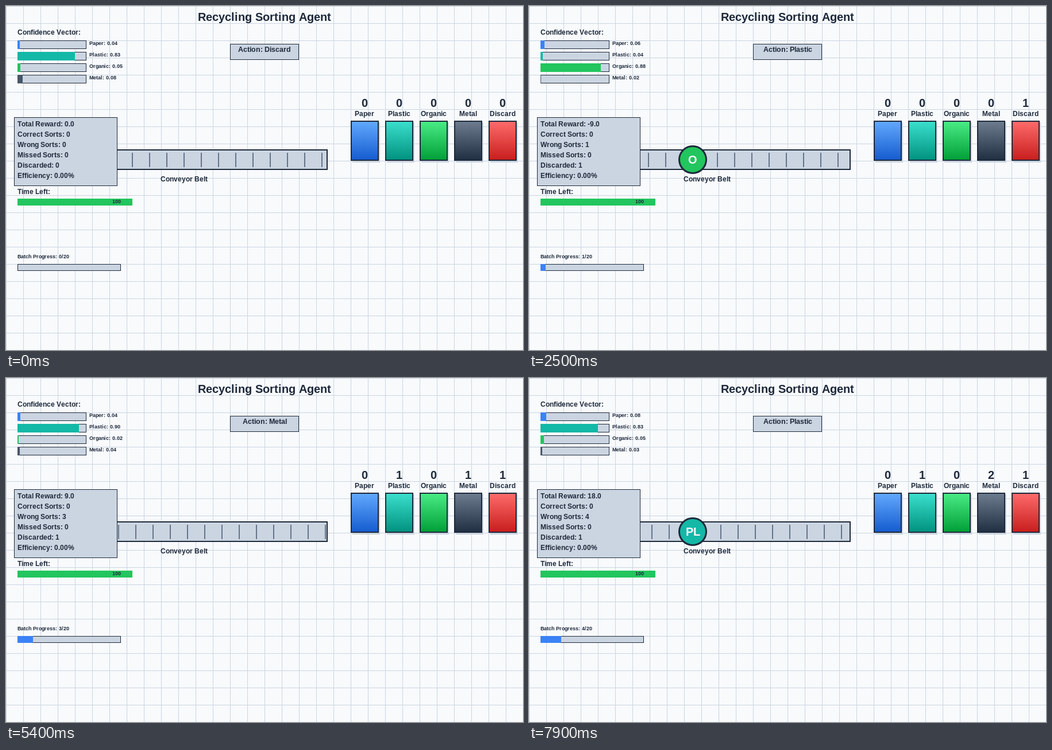
An HTML page with a canvas for the animation above (8 s loop, 900 px wide and 600 px high).

```html
<!DOCTYPE html>
<html lang="en">
<head>
<meta charset="utf-8">
<title>Recycling Sorting Agent</title>
<style>
html, body { margin: 0; width: 100%; height: 100%; overflow: hidden; background: #f8fafc; }
canvas { display: block; }
</style>
</head>
<body>
<canvas id="stage" width="900" height="600"></canvas>
<script>
const ctx = document.getElementById('stage').getContext('2d');
const INK = '#1e293b', PALE = '#cbd5e1', PAPER = '#f8fafc';
const STEP = 100, STEPS = 80, CYCLE = 18, TRAVEL = 15;

const bins = [
  ['Paper', [59, 130, 246]],
  ['Plastic', [20, 184, 166]],
  ['Organic', [34, 197, 94]],
  ['Metal', [71, 85, 105]],
  ['Discard', [239, 68, 68]]
];

// bin and action are indexes into bins; conf follows the order of the first four
const rounds = [
  { bin: 1, tag: 'PL', action: 4, reward: 0, conf: [.038, .834, .049, .08] },
  { bin: 2, tag: 'O', action: 1, reward: -9, conf: [.06, .038, .88, .016] },
  { bin: 2, tag: 'O', action: 3, reward: 0, conf: [.087, .027, .842, .04] },
  { bin: 1, tag: 'PL', action: 3, reward: 9, conf: [.043, .896, .02, .04] },
  { bin: 1, tag: 'PL', action: 1, reward: 18, conf: [.084, .834, .051, .028] }
];

const rgb = (c, shift = 0) =>
  `rgb(${c.map(v => Math.max(0, Math.min(255, v + shift))).join()})`;

function rect(x, y, w, h, fill) {
  ctx.fillStyle = fill;
  ctx.fillRect(x, y, w, h);
}

function box(x, y, w, h, line = 1, fill = PALE) {
  rect(x, y, w, h, INK);
  rect(x + line, y + line, w - 2 * line, h - 2 * line, fill);
}

// Letters advance by whole pixels
function text(str, x, y, size = 12, centered = false, color = INK) {
  ctx.font = `bold ${size}px "Liberation Sans", Arial, sans-serif`;
  ctx.fillStyle = color;
  const widths = [...str].map(ch => Math.round(ctx.measureText(ch).width));
  if (centered) x = Math.round(x - widths.reduce((a, b) => a + b) / 2);
  [...str].forEach((ch, i) => {
    ctx.fillText(ch, x, y);
    x += widths[i];
  });
}

function drawGrid() {
  rect(0, 0, 900, 600, PAPER);
  for (let x = 0; x < 900; x += 30) rect(x, 0, 1, 600, PALE);
  for (let y = 0; y < 600; y += 30) rect(0, y, 900, 1, PALE);
}

function drawBelt(shift) {
  rect(60, 250, 500, 36, PALE);
  for (let x = 70 + shift % 30; x <= 560; x += 30) rect(x - 1, 256, 2, 25, '#64748b');
  ctx.strokeStyle = INK;
  ctx.lineWidth = 2;
  ctx.strokeRect(61, 251, 498, 34);
  text('Conveyor Belt', 310, 306, 12, true);
}

function drawItem(x, { bin, tag }) {
  ctx.beginPath();
  ctx.arc(x, 268, 23.5, 0, 7);
  ctx.fillStyle = rgb(bins[bin][1]);
  ctx.fill();
  ctx.strokeStyle = INK;
  ctx.lineWidth = 3;
  ctx.stroke();
  text(tag, x, 275, 20, true, PAPER);
}

function drawBin([name, color], i, count) {
  const x = 600 + 60 * i;
  const shade = ctx.createLinearGradient(0, 200, 0, 270);
  shade.addColorStop(0, rgb(color, 40));
  shade.addColorStop(1, rgb(color, -40));
  rect(x + 3, 203, 48, 70, PALE);
  box(x, 200, 49, 70, 2, shade);
  text(String(count), x + 24, 176, 20, true);
  text(name, x + 24, 192, 12, true);
}

function draw(step) {
  const cycle = Math.floor(step / CYCLE), phase = step % CYCLE;
  const moving = phase < TRAVEL;
  const done = moving ? cycle : cycle + 1;
  const sorted = rounds.slice(0, done).map(r => r.action);
  const state = rounds[done];
  const ticks = cycle * TRAVEL + Math.min(phase, TRAVEL);

  drawGrid();
  drawBelt(Math.floor(.38 + .803 * ticks));
  if (moving) drawItem(Math.floor(60 + 450 * phase / 14), rounds[cycle]);
  bins.forEach((b, i) => drawBin(b, i, sorted.filter(a => a === i).length));

  text('Recycling Sorting Agent', 450, 26, 20, true);
  text('Confidence Vector:', 20, 50);
  state.conf.forEach((v, i) => {
    const y = 60 + 20 * i;
    box(20, y, 120, 15);
    rect(20, y, Math.floor(120 * v), 15, rgb(bins[i][1]));
    text(`${bins[i][0]}: ${v.toFixed(2)}`, 145, y + 8, 9);
  });

  box(390, 66, 120, 28);
  text('Action: ' + bins[rounds[cycle].action][0], 450, 80, 12.5, true);

  box(14, 194, 180, 120);
  [
    'Total Reward: ' + state.reward.toFixed(1),
    'Correct Sorts: 0',
    'Wrong Sorts: ' + done,
    'Missed Sorts: 0',
    'Discarded: ' + sorted.filter(a => a === 4).length,
    'Efficiency: 0.00%'
  ].forEach((line, i) => text(line, 20, 210 + 18 * i));

  text('Time Left:', 20, 328);
  rect(20, 336, 200, 12, rgb(bins[2][1]));
  text('100', 185, 344, 9);

  text(`Batch Progress: ${done}/20`, 20, 440, 9);
  box(20, 450, 180, 12);
  rect(20, 450, 9 * done, 12, rgb(bins[0][1]));
}

const start = performance.now();
function tick() {
  draw(Math.floor((performance.now() - start) / STEP) % STEPS);
  requestAnimationFrame(tick);
}
tick();
</script>
</body>
</html>
```
